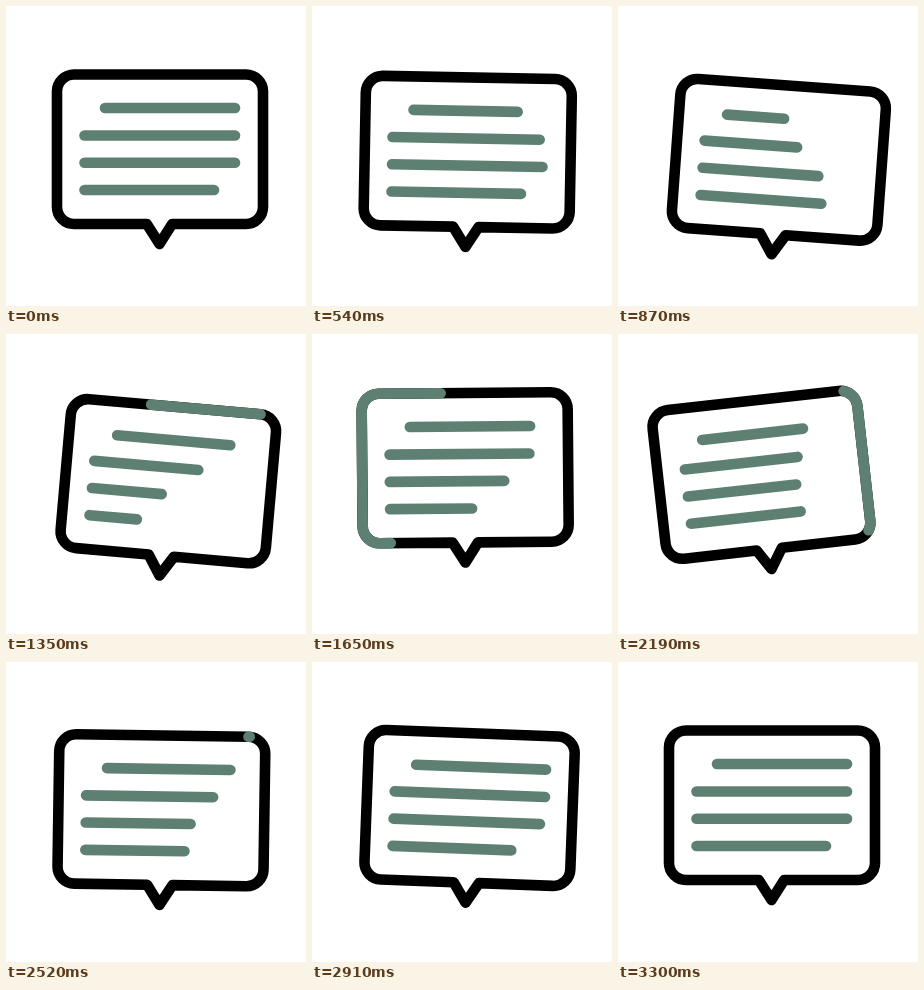
An HTML page that plays this animation: 300x300 px, repeating every 3600 ms.

```html
<!DOCTYPE html>
<html lang="en">
<head>
<meta charset="utf-8">
<title>Speech bubble</title>
<style>
  html, body { margin: 0; width: 100%; height: 100%; overflow: hidden; background: #fff; }
  svg { display: block; width: 100vw; height: 100vh; }
  g { fill: none; stroke: #000; stroke-width: 10.6; stroke-linecap: round; stroke-linejoin: round; }
  line, #glow { stroke: #5e8072; }
</style>
</head>
<body>
<svg viewBox="0 0 300 300">
  <g id="bubble">
    <path id="outline" d="M240 68.5H68a17 17 0 0 0-17 17V201a17 17 0 0 0 17 17H140.8L153.5 238L166.2 218H240a17 17 0 0 0 17-17V85.5a17 17 0 0 0-17-17z"/>
    <path id="glow" pathLength="1"/>
  </g>
</svg>
<script>
const STEP = 30, LOOP = 3600;
const bubble = document.getElementById('bubble');
const glow = document.getElementById('glow');
glow.setAttribute('d', document.getElementById('outline').getAttribute('d'));

// Text lines: position, full length, start of motion and relative lengths at each key
const lines = [
  { x: 99, y: 102, len: 130, start: 10, keys: [1, .436, .955, .766, 1] },
  { x: 78.5, y: 129.5, len: 150.5, start: 15.5, keys: [1, .49, .93, .745, 1] },
  { x: 78.5, y: 156.7, len: 150.5, start: 20.5, keys: [1, .41, .84, .67, 1] },
  { x: 78.5, y: 184, len: 129.5, start: 25, keys: [1, .367, .9, .765, 1] }
];

function set(el, attrs) {
  for (const name in attrs) el.setAttribute(name, attrs[name]);
}

for (const l of lines) {
  l.el = document.createElementNS('http://www.w3.org/2000/svg', 'line');
  set(l.el, { x1: l.x, y1: l.y, y2: l.y });
  bubble.append(l.el);
}

// Smooth interpolation through values placed at the given times
function tween(t, times, values) {
  if (t <= times[0]) return values[0];
  for (let i = 1; i < times.length; i++) {
    if (t < times[i]) {
      const u = (t - times[i - 1]) / (times[i] - times[i - 1]);
      return values[i - 1] + (values[i] - values[i - 1]) * u * u * (3 - 2 * u);
    }
  }
  return values[values.length - 1];
}

function draw(t) {
  const angle = tween(t, [10, 40, 70, 90, 110], [0, 6, -7, 3, 0]);
  const lift = tween(t, [10, 35, 60, 85, 110], [0, 12, -12, 5, 0]);
  set(bubble, { transform: `translate(0 ${lift}) rotate(${angle} 153.5 238)` });

  for (const l of lines) {
    const times = l.keys.map((_, i) => l.start + 20 * i);
    set(l.el, { x2: l.x + l.len * tween(t, times, l.keys) });
  }

  // A coloured stretch runs once around the outline
  const head = tween(t, [35, 75], [0, 1]);
  const tail = tween(t, [45, 85], [0, 1]);
  set(glow, {
    visibility: head > tail ? 'visible' : 'hidden',
    'stroke-dasharray': `${head - tail} 9`,
    'stroke-dashoffset': -tail
  });
}

const begin = performance.now();
function tick() {
  draw(Math.floor((performance.now() - begin) % LOOP / STEP));
  requestAnimationFrame(tick);
}
tick();
</script>
</body>
</html>
```
